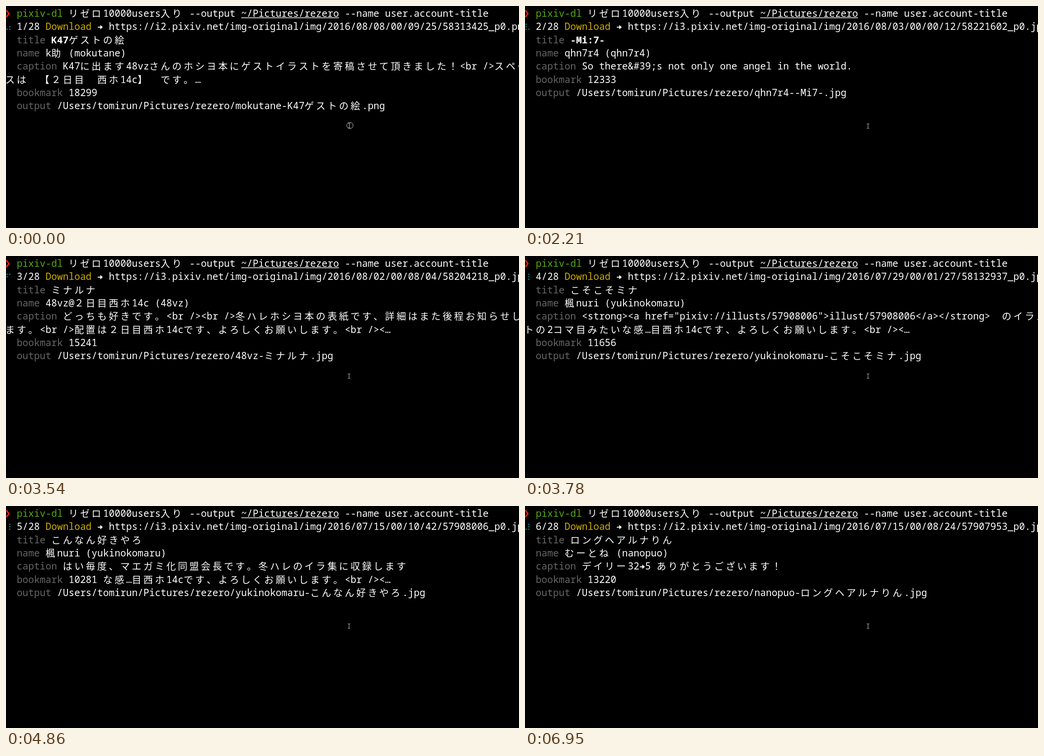
Write an HTML page with a canvas that moves like this. It is 1135x493 px and loops after 7.05 s.

```html
<!DOCTYPE html>
<html lang="ja">
<head>
<meta charset="utf-8">
<title>Download log</title>
<style>
html, body { margin: 0; width: 100%; height: 100%; overflow: hidden; background: #000; }
canvas { display: block; }
</style>
</head>
<body>
<canvas id="stage" width="1135" height="493"></canvas>
<script>
const ctx = document.getElementById('stage').getContext('2d');
const LOOP = 7050, CELL = 12.73, LEFT = -1.6, BASE = 24, PITCH = 29.35, COLS = 91;
const WHITE = '#fff', GRAY = '#666', GREEN = '#58a80c', YELLOW = '#d0ae04', CYAN = '#149a9e', RED = '#e8200c';

// Redraw times as runs: first, last, number of steps
const runs = [[0, 0, 1], [150, 150, 1], [360, 360, 1], [510, 1110, 6], [1260, 1380, 2],
  [1610, 2210, 6], [2330, 2920, 6], [3040, 3400, 4], [3540, 3780, 3], [3930, 4630, 7],
  [4750, 4980, 3], [5130, 5730, 6], [5850, 6090, 3], [6240, 6360, 2], [6600, 6950, 4]];
const ticks = runs.flatMap(([a, b, n]) =>
  Array.from({ length: n }, (_, i) => n > 1 ? Math.floor((a + (b - a) * i / (n - 1)) / 10) * 10 : a));

const works = [
  { at: 0, host: 'i2', path: '2016/08/08/00/09/25/58313425', ext: 'png', title: 'K47ゲストの絵',
    name: 'k助', id: 'mokutane', marks: 18299,
    caption: 'K47に出ます48vzさんのホシヨ本にゲストイラストを寄稿させて頂きました！<br />スペースは　【２日目　西ホ14c】　です。…' },
  { at: 990, host: 'i3', path: '2016/08/03/00/00/12/58221602', ext: 'jpg', title: '-Mi:7-',
    name: 'qhn7r4', id: 'qhn7r4', marks: 12333,
    caption: 'So there&#39;s not only one angel in the world.' },
  { at: 2330, host: 'i3', path: '2016/08/02/00/08/04/58204218', ext: 'jpg', title: 'ミナルナ',
    name: '48vz@２日目西ホ14c', id: '48vz', marks: 15241,
    caption: 'どっちも好きです。<br /><br />冬ハレホシヨ本の表紙です、詳細はまた後程お知らせします。<br />配置は２日目西ホ14cです、よろしくお願いします。<br /><…' },
  { at: 3660, host: 'i2', path: '2016/07/29/00/01/27/58132937', ext: 'jpg', title: 'こそこそミナ',
    name: '楓nuri', id: 'yukinokomaru', marks: 11656,
    caption: '<strong><a href="pixiv://illusts/57908006">illust/57908006</a></strong>　のイラストの2コマ目みたいな感…' },
  { at: 4860, host: 'i3', path: '2016/07/15/00/10/42/57908006', ext: 'jpg', title: 'こんなん好きやろ',
    name: '楓nuri', id: 'yukinokomaru', marks: 10281,
    caption: 'はい毎度、マエガミ化同盟会長です。冬ハレのイラ集に収録します' },
  { at: 5970, host: 'i2', path: '2016/07/15/00/08/24/57907953', ext: 'jpg', title: 'ロングヘアルナりん',
    name: 'むーとね', id: 'nanopuo', marks: 13220,
    caption: 'デイリー32→5 ありがとうございます！' }
];

const span = ch => ch >= '\u3000' ? 2 : 1;

// Splits a text at the right edge of the terminal
function wrap(text, col) {
  let head = '';
  for (const ch of text) {
    col += span(ch);
    if (col > COLS) break;
    head += ch;
  }
  return [head, text.slice(head.length)];
}

// Blanks everything left of a column
function after(text, from) {
  let col = 0, out = '';
  for (const ch of text) {
    out += col >= from ? ch : ' '.repeat(span(ch));
    col += span(ch);
  }
  return out;
}

for (const w of works) [w.head, w.tail] = wrap(w.caption, 10);

function line(color, width, ...points) {
  ctx.strokeStyle = color;
  ctx.lineWidth = width;
  ctx.beginPath();
  points.forEach(([x, y]) => ctx.lineTo(x, y));
  ctx.stroke();
}

function arrow(x, y) {
  line(ctx.fillStyle, 2, [x + 1, y], [x + 9, y]);
  ctx.beginPath();
  ctx.moveTo(x + 6.5, y - 5);
  ctx.lineTo(x + 12, y);
  ctx.lineTo(x + 6.5, y + 5);
  ctx.fill();
}

// Writes text on the character grid and returns the next free column
function put(row, col, text, color = WHITE, weight = 400) {
  ctx.fillStyle = color;
  for (const ch of text) {
    const wide = span(ch) === 2, x = LEFT + col * CELL, y = BASE + row * PITCH;
    ctx.font = wide ? '21px "Noto Sans CJK JP", "Noto Sans CJK", sans-serif'
      : `${weight} 21.2px "Noto Sans Mono", monospace`;
    if (ch === '→') arrow(x, y - 6.3);
    else ctx.fillText(ch, x, y);
    col += span(ch);
  }
  return col;
}

function field(row, label, value, weight) {
  put(row, put(row, 2, label + ' ', GRAY), value, WHITE, weight);
}

function prompt() {
  line(RED, 3, [1, 9.5], [6.5, 17], [1, 24.5]);
  let col = put(0, 2, 'pixiv-dl ', GREEN);
  col = put(0, col, 'リゼロ10000users入り --output ');
  const x = LEFT + col * CELL;
  col = put(0, col, '~/Pictures/rezero');
  line(WHITE, 1.5, [x, 26.3], [LEFT + col * CELL, 26.3]);
  put(0, col, ' --name user.account-title');
}

function spinner(t) {
  const code = [...'⠋⠙⠹⠸⠼⠴⠦⠧⠇⠏'][(5 + Math.round(t / 100.7)) % 10].charCodeAt(0);
  ctx.fillStyle = CYAN;
  for (let i = 0; i < 6; i++) {
    if (!(code >> i & 1)) continue;
    ctx.beginPath();
    ctx.arc(i < 3 ? 2.5 : 8.4, 40.6 + i % 3 * 5.5, 1.35, 0, 7);
    ctx.fill();
  }
}

function pointer(x, y) {
  line('#ccc', 1, [x, y - 5], [x, y + 5]);
  for (const s of [-1, 1]) line('#ccc', 1, [x - 2.5, y + s * 5.5], [x, y + s * 4.5], [x + 2.5, y + s * 5.5]);
}

function draw(t) {
  ctx.fillStyle = '#000';
  ctx.fillRect(0, 0, 1135, 493);
  prompt();
  spinner(t);

  const n = works.findLastIndex(w => t >= w.at), w = works[n];
  let col = put(1, 2, `${n + 1}/28 `);
  col = put(1, col, 'Download ', YELLOW);
  put(1, col, `→ https://${w.host}.pixiv.net/img-original/img/${w.path}_p0.${w.ext}`);
  field(2, 'title', w.title, 600);
  field(3, 'name', `${w.name} (${w.id})`);
  field(4, 'caption', w.head);
  let row = 5;
  if (w.tail) put(row++, 0, w.tail);
  field(row++, 'bookmark', String(w.marks));
  field(row, 'output', `/Users/tomirun/Pictures/rezero/${w.id}-${w.title.replace(':', '')}.${w.ext}`);

  // Wrapped rows are not erased at once, so old text shows past the new
  const fresh = n === 4 && t < 4980;
  if (n === 1 && t < 1110) put(5, 0, after(works[0].tail, 16));
  if (n === 3 || fresh) put(5, 0, after(works[2].tail, 22));
  if (fresh) put(5, 0, after(works[3].tail, 16));

  if (t < 150) {
    pointer(759.5, 265.5);
    ctx.beginPath();
    ctx.arc(760.8, 265.3, 7, 0, 7);
    ctx.stroke();
  } else pointer(759, 266.8);
}

let shown = -1;
function frame(now) {
  const t = ticks.findLast(tick => tick <= now % LOOP);
  if (t !== shown) draw(shown = t);
  requestAnimationFrame(frame);
}
requestAnimationFrame(frame);
</script>
</body>
</html>
```
